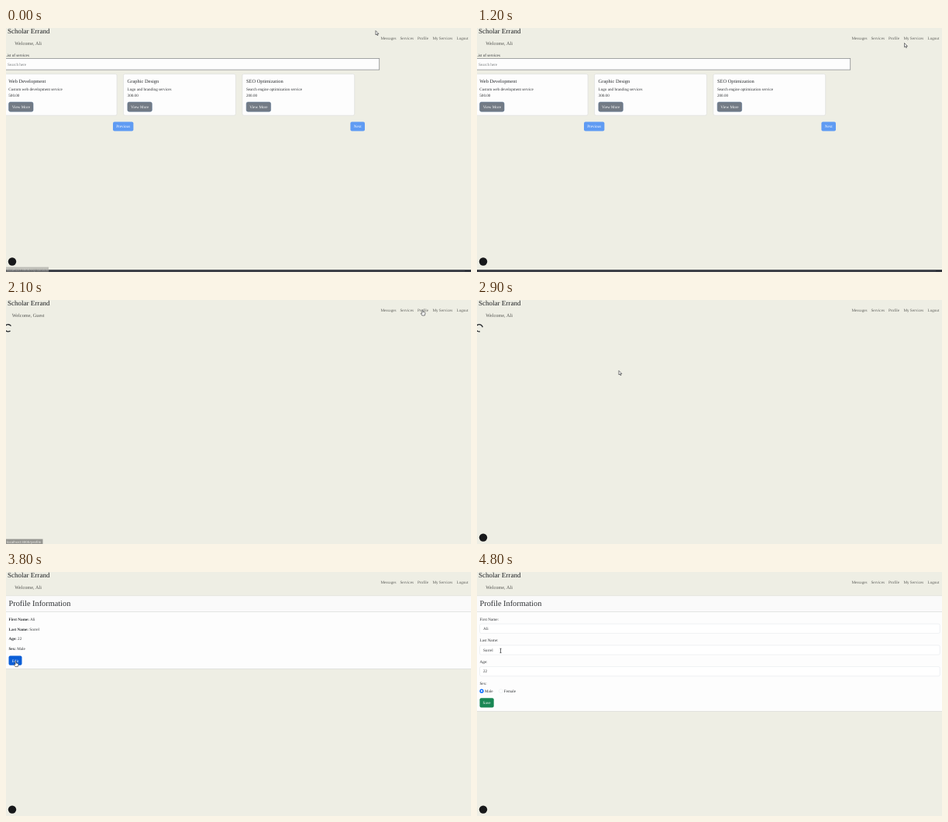
Recreate the animation shown at these times as an HTML page. Size 600 by 316 pixels, loop 5000 ms.

```html
<!DOCTYPE html>
<html lang="en">
<head>
<meta charset="utf-8">
<title>Services and profile</title>
<style>
  html, body { margin: 0; width: 100%; height: 100%; overflow: hidden; background: #eeeee4; }
  svg { display: block; width: 100vw; height: 100vh; }
  text { font-family: "Liberation Serif", "Times New Roman", serif; font-size: 5.15px; fill: #2b2e31; text-rendering: geometricPrecision; white-space: pre; }
  .url { font-family: "Open Sans", "Noto Sans", sans-serif; font-size: 4.35px; fill: #f4f4f0; }
</style>
</head>
<body>
<svg id="stage" viewBox="0 0 600 316" xmlns="http://www.w3.org/2000/svg"></svg>
<script>
const LOOP = 5000, STEP = 100;
const INK = '#2b2e31', PAPER = '#fdfdfd', LINE = '#d9dbd8';
const stage = document.getElementById('stage');

function add(parent, tag, attrs = {}, content) {
  const node = document.createElementNS('http://www.w3.org/2000/svg', tag);
  for (const key in attrs) node.setAttribute(key, attrs[key]);
  if (content !== undefined) node.textContent = content;
  parent.appendChild(node);
  return node;
}
const group = (parent = stage) => add(parent, 'g');
const box = (parent, x, y, width, height, fill, attrs = {}) =>
  add(parent, 'rect', { x, y, width, height, fill, ...attrs });
const label = (parent, x, y, content, { size = 5.15, fill = INK, ...attrs } = {}) =>
  add(parent, 'text', { x, y, style: `font-size:${size}px;fill:${fill}`, ...attrs }, content);
const show = (node, on) => node.setAttribute('visibility', on ? 'visible' : 'hidden');

function button(parent, x, y, width, content, fill, attrs = {}) {
  const face = box(parent, x, y, width, 12.2, fill, { rx: 2, ...attrs });
  label(parent, x + width / 2, y + 7.9, content, { fill: '#fff', 'text-anchor': 'middle' });
  return face;
}

// Header
box(stage, 0, 0, 600, 316, '#eeeee4');
label(stage, 2, 7.2, 'Scholar Errand', { size: 9.04, fill: '#1c1e20' });
const welcome = label(stage, 28.7, 22.2, '', { size: 6.35, fill: '#555652', 'text-anchor': 'middle' });
[['Messages', 483.5], ['Services', 508.5], ['Profile', 531], ['My Services', 550.4], ['Logout', 581.5]]
  .forEach(([name, x]) => label(stage, x, 14.8, name, { fill: '#5a5b57' }));

// Services page
const services = group();
label(services, -1.5, 37, 'List of services');
box(services, -2, 39.5, 483.7, 14.6, PAPER, { stroke: '#8d8f90', 'stroke-width': .8 });
label(services, 2, 48.6, 'Search here', { fill: '#777a7c' });
[
  ['Web Development', 'Custom web development service', '500.00'],
  ['Graphic Design', 'Logo and branding services', '300.00'],
  ['SEO Optimization', 'Search engine optimization service', '200.00']
].forEach(([title, about, price], i) => {
  const x = 3.3 + i * 153.3;
  box(services, x - 5, 59.6, 144.8, 53.6, PAPER, { rx: 2, stroke: LINE, 'stroke-width': .6 });
  label(services, x, 71.3, title, { size: 6.44 });
  label(services, x, 80.8, about);
  label(services, x, 88.5, price);
  button(services, x + .3, 96, 31.4, 'View More', '#737b85', { stroke: '#57718f', 'stroke-width': .6 });
});
button(services, 138, 121.4, 26.4, 'Previous', '#5f9bf3');
button(services, 444.4, 121.4, 18.6, 'Next', '#5f9bf3');
box(services, 0, 313, 600, 3, '#33363e');
box(services, 2, 314, 590, .8, '#50535b');

// Profile page
const profile = group();
const panel = box(profile, -1, 31, 602, 94.5, PAPER, { stroke: LINE, 'stroke-width': .7 });
box(profile, 0, 31.3, 600, 20.2, '#fafafa');
box(profile, 0, 51.2, 600, .7, LINE);
label(profile, 3.5, 44, 'Profile Information', { size: 10.3 });

const details = group(profile);
[['First Name:', 'Ali'], ['Last Name:', 'Sorrel'], ['Age:', '22'], ['Sex:', 'Male']].forEach(([name, value], i) => {
  const line = label(details, 3.5, 62.7 + i * 12.8, '');
  add(line, 'tspan', { 'font-weight': 'bold' }, name);
  add(line, 'tspan', {}, ' ' + value);
});
const edit = button(details, 3.5, 108.6, 17, 'Edit', '#0d6efd');

const form = group(profile);
[['First Name:', 'Ali'], ['Last Name:', 'Sorrel'], ['Age:', '22']].forEach(([name, value], i) => {
  const y = i * 27.7;
  label(form, 3.5, 62.7 + y, name);
  box(form, 3.5, 67.2 + y, 593.8, 12.2, '#fff', { rx: 2, stroke: '#dee2e6', 'stroke-width': .5 });
  label(form, 8, 75 + y, value);
});
label(form, 3.5, 145.7, 'Sex:');
add(form, 'circle', { cx: 6, cy: 154.2, r: 2.6, fill: '#0d6efd' });
add(form, 'circle', { cx: 6, cy: 154.2, r: 1.1, fill: '#fff' });
label(form, 10, 156, 'Male');
add(form, 'circle', { cx: 30.8, cy: 154.2, r: 2.4, fill: '#fff', stroke: '#dee2e6', 'stroke-width': .4 });
label(form, 34.8, 156, 'Female');
button(form, 3.5, 163.2, 18.2, 'Save', '#198754');
const ageArrows = add(form, 'path', { d: 'M589 128 l2 -2 l2 2 z M589 129 l2 2 l2 -2 z', fill: '#777' });

// Overlays
const spinner = add(stage, 'path', {
  d: 'M3.25 -3.25 A4.6 4.6 0 1 0 3.25 3.25', fill: 'none', stroke: '#222528', 'stroke-width': 1.3
});
const badge = add(stage, 'circle', { cx: 8, r: 5.2, fill: '#17181a' });
const status = group();
const statusBack = box(status, 0, 309.6, 47.5, 6.4, '#969691');
const statusText = add(status, 'text', { x: 1, y: 314.9, class: 'url' });

const outline = { fill: '#fff', stroke: '#26282a', 'stroke-width': .6, 'stroke-linejoin': 'round' };
const pointers = {
  arrow: add(stage, 'path', { d: 'M0 0 V5.4 L1.3 4.3 L2.2 6.2 L3 5.8 L2.2 4 H3.9 Z', ...outline }),
  hand: add(stage, 'path', {
    d: 'M-.6 .4 Q0 -.4 .6 .4 V2.4 L3 3 Q3.6 3.2 3.4 4.2 L2.8 7 H-.6 L-2.3 4.4 Q-2 3.4 -.6 4.4 Z', ...outline
  }),
  beam: add(stage, 'path', {
    d: 'M-1 0 H1 M0 0 V5.4 M-1 5.4 H1', fill: 'none', stroke: '#26282a', 'stroke-width': .7
  })
};

// Time, x, y, and the pointer shape from that time on
const route = [
  [0, 477, 3.5, 'arrow'], [300, 579, 4], [600, 564, 3], [700, 560, 0],
  [900, 556, 9, 'hand'], [1100, 552.5, 17, 'arrow'], [1200, 551.5, 19.5], [1400, 543, 16],
  [1500, 540, 14, 'hand'], [1600, 537.5, 13], [2200, 537.5, 13], [2300, 520, 20, 'arrow'],
  [2500, 420, 45], [2700, 285, 72], [2900, 183, 91.5], [3000, 149, 99], [3100, 126, 102],
  [3400, 45, 110], [3600, 15, 116, 'hand'], [3700, 12.6, 115.6], [3900, 12.6, 115.6, 'arrow'],
  [4300, 12.6, 115.6], [4400, 15, 123, 'beam'], [4600, 24, 117, 'arrow'], [4700, 29, 103, 'beam'], [4800, 30.5, 99.2]
];

function pointerAt(t) {
  let shape = 'arrow', i = 0;
  for (; i < route.length && route[i][0] <= t; i++) shape = route[i][3] || shape;
  const from = route[i - 1], to = route[i] || from;
  const k = to === from ? 0 : (t - from[0]) / (to[0] - from[0]);
  return { shape, x: from[1] + (to[1] - from[1]) * k, y: from[2] + (to[2] - from[2]) * k };
}

function statusAt(t) {
  if (t < 200) return ['my-services', 55, .55 - t / 400];
  if (t >= 900 && t < 1200) return ['my-services', 55, t < 1100 ? 1 : .5];
  if (t >= 1500 && t < 2300) return ['profile', 47.5, 1];
  return ['', 0, 0];
}

function render(t) {
  const onServices = t < 2000, loading = !onServices && t < 3000, editing = t >= 3900;
  show(services, onServices);
  show(spinner, loading);
  show(profile, t >= 3000);
  details.style.display = editing ? 'none' : '';
  form.style.display = editing ? '' : 'none';
  panel.setAttribute('height', editing ? 149.5 : 94.5);
  edit.setAttribute('fill', t >= 3600 ? '#0b5ed7' : '#0d6efd');
  ageArrows.style.display = t >= 4400 && t < 4600 ? '' : 'none';
  welcome.textContent = 'Welcome, ' + (t >= 2000 && t < 2600 ? 'Guest' : 'Ali');
  spinner.setAttribute('transform', `translate(2.8 36.3) rotate(${(t - 2100) / 750 * 360 + 8})`);
  badge.setAttribute('cy', onServices ? 302.5 : 307.6);
  show(badge, onServices || t >= 2300);

  const [page, width, opacity] = statusAt(t);
  statusBack.setAttribute('width', width);
  statusText.textContent = page && 'localhost:3000/' + page;
  status.setAttribute('opacity', opacity);

  const { shape, x, y } = pointerAt(t);
  for (const name in pointers) show(pointers[name], name === shape);
  pointers[shape].setAttribute('transform', `translate(${x} ${y})`);
}

const start = performance.now();
function tick() {
  const t = (performance.now() - start) % LOOP;
  render(Math.floor(t / STEP) * STEP);
  requestAnimationFrame(tick);
}
render(0);
requestAnimationFrame(tick);
</script>
</body>
</html>
```
